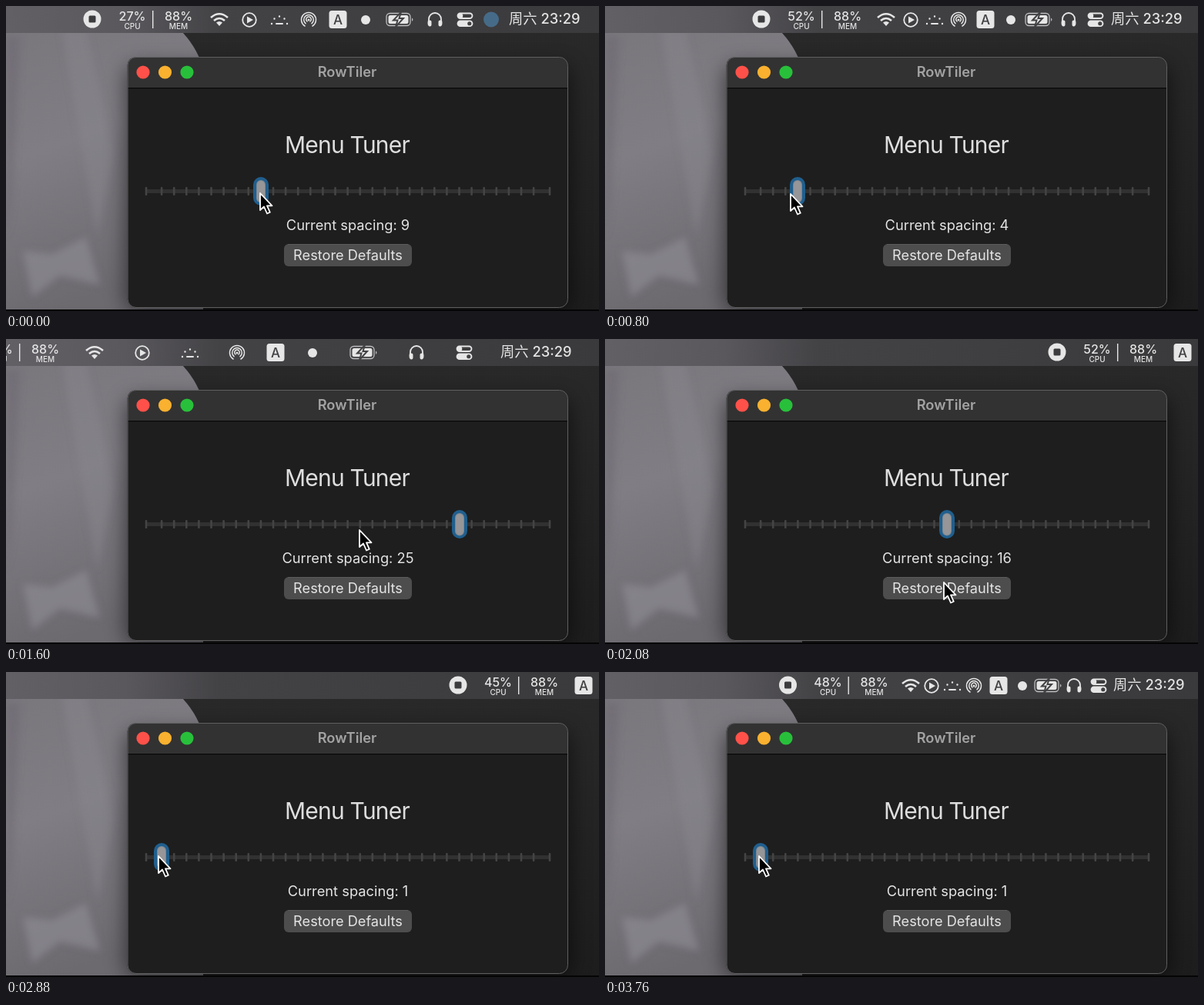
Recreate the animation shown at these times as an HTML page. Size 770 by 396 pixels, loop 3840 ms.

```html
<!DOCTYPE html>
<html lang="en">
<head>
<meta charset="utf-8">
<title>Menu spacing</title>
<style>
  html, body { margin: 0; width: 100%; height: 100%; overflow: hidden; background: #1f1f20; }
  svg { display: block; width: 770px; height: 396px; }
  text { font-family: Inter, "Noto Sans CJK SC", "Noto Sans CJK", sans-serif; fill: #e4e4e4; }
  .mid { text-anchor: middle; }
  .line { fill: none; stroke: #e6e6e6; stroke-width: 1.8; stroke-linecap: round; stroke-linejoin: round; }
  .fill { fill: #e6e6e6; }
</style>
</head>
<body>
<svg viewBox="0 0 770 396">
  <defs>
    <linearGradient id="bar">
      <stop offset="0" stop-color="#625f65"/>
      <stop offset=".2" stop-color="#5a585d"/>
      <stop offset=".36" stop-color="#434245"/>
      <stop offset="1" stop-color="#3a393b"/>
    </linearGradient>
    <linearGradient id="cloth" x2=".25" y2="1">
      <stop offset="0" stop-color="#79767c"/>
      <stop offset=".45" stop-color="#807d84"/>
      <stop offset="1" stop-color="#6c696f"/>
    </linearGradient>
    <linearGradient id="dark" x2="0" y2="1">
      <stop offset="0" stop-color="#2a2a2b"/>
      <stop offset="1" stop-color="#1d1d1e"/>
    </linearGradient>
    <filter id="soft" x="-30%" y="-30%" width="160%" height="160%"><feGaussianBlur stdDeviation="5"/></filter>
    <filter id="shade" x="-20%" y="-20%" width="140%" height="140%"><feGaussianBlur stdDeviation="14"/></filter>
  </defs>

  <rect width="770" height="396" fill="url(#dark)"/>
  <path d="M0 30H225Q246 50 256 80V396H0Z" fill="url(#cloth)"/>
  <g filter="url(#soft)">
    <path d="M72 30L104 30L140 190L118 300Z" fill="#8a878e" opacity=".45"/>
    <path d="M22 318L60 322L104 300L122 362L70 350L34 378Z" fill="#928f97" opacity=".6"/>
    <path d="M0 40L18 40L8 250L0 300Z" fill="#6f6c73" opacity=".6"/>
  </g>
  <rect x="156" y="78" width="576" height="318" rx="12" fill="#000" opacity=".55" filter="url(#shade)"/>
  <rect y="394" width="770" height="2" fill="#050505"/>

  <rect width="770" height="35" fill="url(#bar)"/>
  <g id="menu">
    <g id="stats">
      <circle class="fill" cy="17" r="11.5"/>
      <rect x="-4.5" y="12.5" width="9" height="9" rx="1.5" fill="#3c3b3e"/>
      <text id="cpu" class="mid" x="52" y="19" font-size="16" font-weight="500"></text>
      <text class="mid" x="52" y="30" font-size="10" font-weight="500">CPU</text>
      <rect class="fill" x="78" y="6" width="1.4" height="23"/>
      <text class="mid" x="112" y="19" font-size="16" font-weight="500">88%</text>
      <text class="mid" x="112" y="30" font-size="10" font-weight="500">MEM</text>
    </g>
    <g id="wifi">
      <g class="line" stroke-width="2.6" style="stroke-width:2.6;stroke-linecap:butt">
        <path d="M-11 15Q0 5.500 11 15M-7 19Q0 13 7 19"/>
      </g>
      <path class="fill" d="M-4 21.500Q0 18.500 4 21.500L0 26Z"/>
    </g>
    <g id="play">
      <circle class="line" cy="18" r="8.8"/>
      <path class="fill" d="M-3 13.500L5 18L-3 22.500Z"/>
    </g>
    <g id="glow">
      <path class="line" style="stroke-width:2.4" d="M-10 23h0M-6.500 16.500h0M0 13.500h0M6.500 16.500h0M10 23h0"/>
      <path class="line" style="stroke-width:2" d="M-4 23H4"/>
    </g>
    <g id="waves">
      <path class="line" style="stroke-width:1.5" d="M-5 26A9.500 9.500 0 1 1 5 26M-4 22.700A6.300 6.300 0 1 1 4 22.700M-2 20A3.300 3.300 0 1 1 2 20"/>
      <circle class="fill" cy="18" r="1.5"/>
    </g>
    <g id="input">
      <rect class="fill" x="-11.500" y="6" width="23" height="23" rx="3.500"/>
      <text class="mid" y="23.500" font-size="17" font-weight="500" style="fill:#414043">A</text>
    </g>
    <g id="radio"><circle class="fill" cy="18" r="6"/></g>
    <g id="battery">
      <rect class="line" style="stroke-width:1.3;stroke:#bdbdbf" x="-17" y="9.500" width="31" height="16" rx="4.500"/>
      <rect class="fill" x="-14.500" y="12" width="26" height="11" rx="2.500"/>
      <path d="M16 15.500q3 2 0 4.500Z" fill="#bdbdbf"/>
      <path d="M2 8L-8 18.500H-2.500L-5 27L5 16H-.5Z" class="fill" stroke="#424144" stroke-width="2"/>
    </g>
    <g id="phones">
      <path class="line" d="M-8 20V17A8 8 0 0 1 8 17V20"/>
      <path class="fill" d="M-9 18.500h2.500a2 2 0 0 1 2 2v4a2 2 0 0 1-2 2q-3 0-3-5ZM9 18.500h-2.500a2 2 0 0 0-2 2v4a2 2 0 0 0 2 2q3 0 3-5Z"/>
    </g>
    <g id="toggles">
      <rect class="line" x="-9.500" y="9.500" width="19" height="6.500" rx="3.250"/>
      <circle class="fill" cx="-6" cy="12.750" r="3.300"/>
      <rect class="fill" x="-10.400" y="18.500" width="20.800" height="8.500" rx="4.250"/>
      <circle cx="5.800" cy="22.750" r="2.600" fill="#424144"/>
    </g>
    <g id="helper"><circle cy="17.500" r="10" fill="#466b88"/></g>
    <g id="clock"><text y="23" font-size="18.300" font-weight="500">周六 23:29</text></g>
  </g>

  <rect x="157.500" y="66.500" width="572" height="325" rx="11" fill="#1e1e1e"/>
  <path d="M158 106V77Q158 67 168 67H719Q729 67 729 77V106Z" fill="#323232"/>
  <rect x="158" y="106" width="571" height="1.200" fill="#080808"/>
  <rect x="158" y="66.500" width="571.500" height="325" rx="11" fill="none" stroke="#606061"/>
  <circle cx="178" cy="86" r="8.600" fill="#ff5149"/>
  <circle cx="206.500" cy="86" r="8.600" fill="#f9b12f"/>
  <circle cx="235" cy="86" r="8.600" fill="#28c03b"/>
  <text class="mid" x="443" y="92" font-size="18.300" font-weight="600" style="fill:#a3a3a3">RowTiler</text>
  <text class="mid" x="443" y="191" font-size="30" letter-spacing="-.8" style="fill:#dedede">Menu Tuner</text>

  <rect x="181" y="238" width="526" height="5" rx="2.500" fill="#313131"/>
  <g id="ticks" fill="#444"></g>
  <g id="knob">
    <rect x="-10" y="222" width="20" height="37" rx="10" fill="#205f8e"/>
    <rect x="-6" y="226" width="12" height="29.500" rx="6" fill="#7a8791"/>
    <rect x="-5" y="227" width="10" height="27.500" rx="5" fill="#969598"/>
  </g>
  <text id="label" class="mid" x="444" y="291" font-size="18.300"></text>
  <rect x="361" y="309" width="166" height="29" rx="6" fill="#4d4d4d"/>
  <path d="M366 309.500H522" stroke="#5c5c5c"/>
  <text class="mid" x="444" y="329.500" font-size="18.200">Restore Defaults</text>
  <path id="cursor" d="M0 0V22L5 17.500L9 26.500L12.800 24.800L9 16.300H15.500Z" fill="#000" stroke="#fff" stroke-width="1.800" stroke-linejoin="round"/>
</svg>
<script>
const LOOP = 3840, STEP = 80;
const el = id => document.getElementById(id);
const move = (id, x, y = 0) => el(id).setAttribute('transform', `translate(${x} ${y})`);
const mix = (a, b, k) => a + (b - a) * k;

const items = ['stats', 'wifi', 'play', 'glow', 'waves', 'input', 'radio',
  'battery', 'phones', 'toggles', 'clock', 'helper'];

// Item positions by spacing; "busy" is the bar while its apps restart.
const bars = {
  1: [237.5, 397, 424, 451, 479, 511, 542, 575, 609, 641, 660],
  4: [203, 365, 397, 428, 459, 494, 527, 563, 602, 637, 657],
  9: [112, 277, 316, 355, 393, 431, 467, 511, 557, 596, 653, 630],
  25: [-61, 115, 177, 239, 300, 350, 398, 464, 533, 595, 642],
  busy: [587, , , , , 750]
};
bars[16] = bars[4].map((x, i) => mix(x, bars[25][i], 12 / 21));

// Held values: [time, value, ...]
const barSteps = [[0, 9, 27], [400, 'busy', 27], [640, 4, 52], [1200, 'busy', 52], [1520, 25, 52],
  [1920, 'busy', 52], [2320, 16, 45], [2640, 'busy', 45], [3200, 1, 48]];
const valueSteps = [[0, 9], [160, 7], [240, 5], [320, 4], [1200, 25], [1920, 16], [2560, 1]];

// Moving values: [time, x, y]
const knobPath = [[0, 331], [80, 331], [320, 250], [1200, 250], [1280, 426], [1360, 589],
  [1920, 589], [2080, 444], [2560, 444], [2720, 202]];
const cursorPath = [[0, 330, 243], [80, 330, 243], [320, 241, 244], [880, 241, 244], [1120, 581, 235],
  [1360, 581, 235], [1600, 459, 248], [1680, 451, 292], [1840, 440, 316], [2160, 440, 316],
  [2560, 198, 239], [2880, 198, 239], [3360, 200, 239]];

const held = (rows, t) => rows.filter(r => r[0] <= t).pop();
function along(rows, t) {
  const i = rows.findIndex(r => r[0] > t);
  if (i < 0) return rows[rows.length - 1].slice(1);
  const a = rows[i - 1], b = rows[i], k = (t - a[0]) / (b[0] - a[0]);
  return a.slice(1).map((v, n) => mix(v, b[n + 1], k));
}

for (let i = 0; i <= 32; i++) {
  const x = i === 0 ? 182 : i === 32 ? 706 : 186 + 16.1 * i;
  el('ticks').insertAdjacentHTML('beforeend',
    `<rect x="${x - 1.3}" y="235" width="2.6" height="11" rx="1"/>`);
}

function draw(t) {
  const [, bar, cpu] = held(barSteps, t);
  items.forEach((id, i) => {
    const x = bars[bar][i];
    el(id).style.display = x === undefined ? 'none' : '';
    if (x !== undefined) move(id, x);
  });
  el('cpu').textContent = cpu + '%';
  el('label').textContent = 'Current spacing: ' + held(valueSteps, t)[1];
  move('knob', ...along(knobPath, t));
  move('cursor', ...along(cursorPath, t));
}

const start = performance.now();
function frame() {
  const t = (performance.now() - start) % LOOP;
  draw(Math.floor(t / STEP) * STEP);
  requestAnimationFrame(frame);
}
frame();
</script>
</body>
</html>
```
